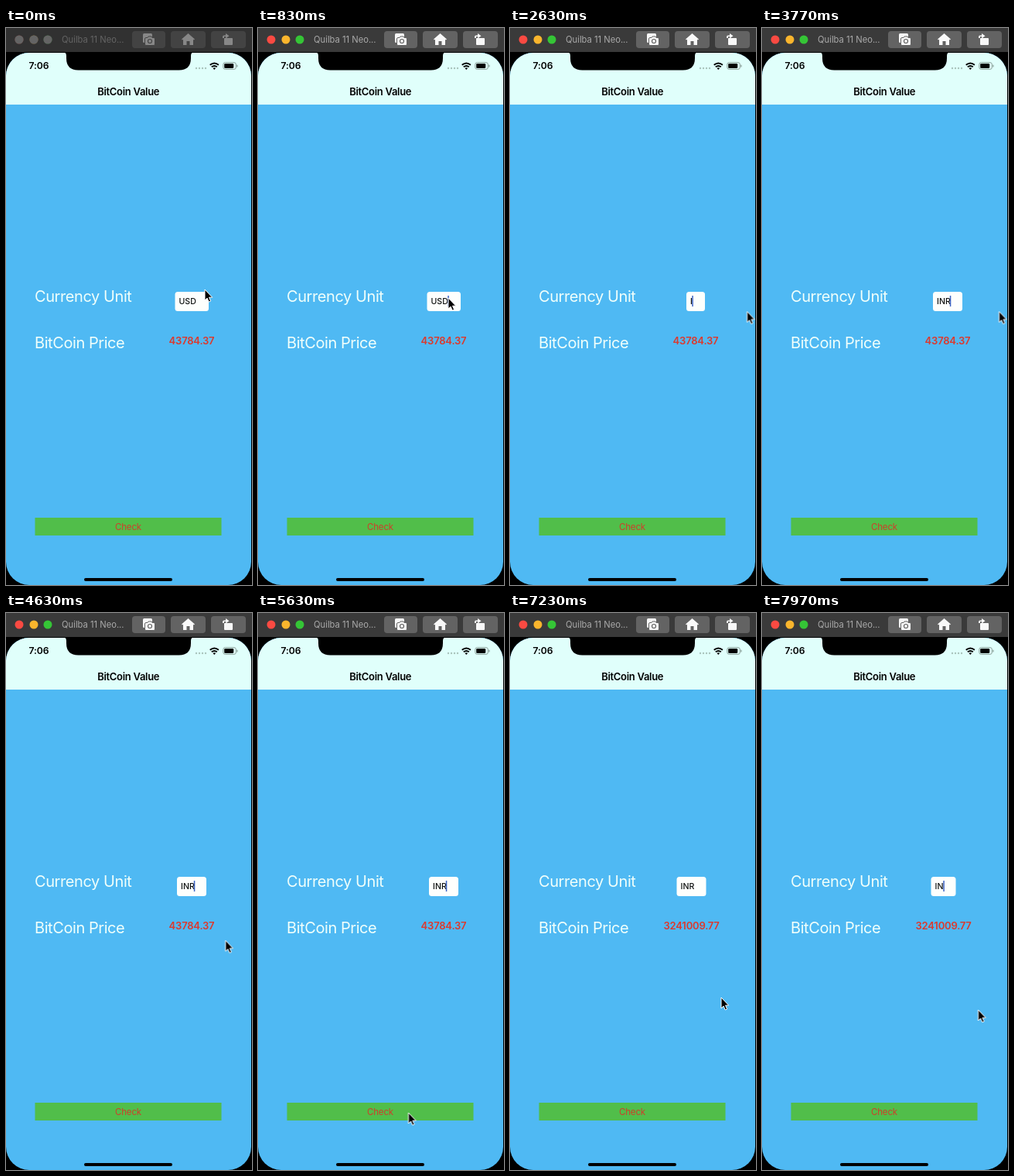
These frames come from a looping animation (318x720 px, 8 s). An HTML page:

```html
<!DOCTYPE html>
<html lang="en">
<head>
<meta charset="utf-8">
<title>BitCoin Value</title>
<style>
  html, body { margin: 0; width: 100%; height: 100%; overflow: hidden; background: #000; }
  svg { display: block; width: 318px; height: 720px; font-family: Inter, "Open Sans", sans-serif; }
  .label { font-size: 20px; letter-spacing: -.42px; fill: #f0fffb; }
  .price { font-size: 13px; font-weight: 600; letter-spacing: -.2px; fill: #dc392d; text-anchor: middle; }
  .unit { font-size: 10.6px; font-weight: 500; fill: #101312; }
  .menu text { font-size: 10.5px; letter-spacing: -.1px; fill: #f2f2f2; text-anchor: middle; }
  .caret { fill: #3c63c4; }
  .tool { fill: #636363; }
</style>
</head>
<body>
<svg viewBox="0 0 318 720">
  <defs>
    <clipPath id="screen"><rect y="32" width="317" height="688" rx="30"/></clipPath>
  </defs>

  <!-- simulator title bar -->
  <rect width="318" height="31" fill="#3a3a3a"/>
  <circle cx="17" cy="15" r="5.5" fill="#fa4a42"/>
  <circle cx="36" cy="15" r="5.5" fill="#fab52d"/>
  <circle cx="54" cy="15" r="5.5" fill="#35c536"/>
  <text x="72" y="19" font-size="11.2" fill="#aaaaaa">Quilba 11 Neo...</text>
  <g class="tool">
    <rect x="163" y="4" width="43" height="22" rx="4"/>
    <rect x="213" y="4" width="45" height="22" rx="4"/>
    <rect x="265" y="4" width="45" height="22" rx="4"/>
  </g>
  <g fill="#f8f8f8">
    <rect x="177" y="7" width="12" height="12" rx="1.5"/>
    <path stroke="#636363" d="M181 12.5h2l1-1.500h4l1 1.500h2q1.500 0 1.500 1.500V21q0 1.500-1.500 1.500H181q-1.500 0-1.500-1.500V14q0-1.500 1.500-1.500Z"/>
    <path d="M235.500 7 244 14.500 243 15.600 242 14.800V22H237.500V17H233.500V22H229V14.800L228 15.600 227 14.500Z"/>
    <rect x="282" y="13" width="11" height="9" rx="1"/>
    <path d="M280 13V11.500q0-2 2-2H284V7l4.500 3.300L284 13.500V11H282V13Z"/>
  </g>
  <circle cx="186" cy="17" r="2.500" fill="none" stroke="#636363" stroke-width="1.200"/>
  <g id="inactive">
    <rect width="318" height="31" fill="#2a2a2a" opacity=".55"/>
    <g fill="#646464">
      <circle cx="17" cy="15" r="5.600"/><circle cx="36" cy="15" r="5.600"/><circle cx="54" cy="15" r="5.600"/>
    </g>
  </g>

  <!-- phone screen -->
  <g clip-path="url(#screen)">
    <rect y="32" width="318" height="688" fill="#4fb9f3"/>
    <rect y="32" width="318" height="67" fill="#e0fffb"/>
    <path d="M73 31q5 0 5 5v3q0 15.500 15.500 15.500H223.500q15.500 0 15.500-15.500v-3q0-5 5-5Z"/>
  </g>
  <text x="29.500" y="53" font-size="12.200" font-weight="600" letter-spacing="-.1">7:06</text>
  <g fill="#a9c4bd">
    <circle cx="246" cy="52" r="1.200"/><circle cx="250" cy="52" r="1.200"/>
    <circle cx="254" cy="52" r="1.200"/><circle cx="258" cy="52" r="1.200"/>
  </g>
  <g fill="none" stroke="#000" stroke-width="1.900">
    <path d="M263.700 47.800q5.600-4.600 11.200 0M265.800 50.300q3.500-2.800 7 0"/>
  </g>
  <path d="M267.500 52q1.800-1.400 3.600 0L269.300 54Z"/>
  <rect x="280.800" y="44.600" width="16.500" height="8.800" rx="2.500" fill="none" stroke="#8a9f98"/>
  <rect x="282.200" y="46" width="12" height="6" rx="1.300"/>
  <rect x="298.300" y="47.500" width="1.200" height="3" rx=".6" fill="#8a9f98"/>
  <text x="158.200" y="87" font-size="13" font-weight="600" letter-spacing="-.3" text-anchor="middle">BitCoin Value</text>

  <text class="label" x="37" y="354">Currency Unit</text>
  <text class="label" x="37" y="414">BitCoin Price</text>
  <text class="price" id="oldPrice" x="240" y="409">43784.37</text>
  <text class="price" id="newPrice" x="234.600" y="409">3241009.77</text>
  <rect x="37.500" y="633" width="241" height="23" fill="#51be4a"/>
  <text id="check" x="158" y="649" font-size="11.500" letter-spacing="-.15" text-anchor="middle" fill="#cf3e2b">Check</text>
  <rect x="101" y="711" width="114" height="4" rx="2"/>

  <g id="fields"></g>

  <g id="selection">
    <rect x="224" y="346" width="22" height="16" fill="#2f6fc0" opacity=".25"/>
    <g fill="#2562b4">
      <rect x="223.200" y="342" width="1.600" height="20"/><circle cx="224" cy="342" r="4.200"/>
      <rect x="245.200" y="346" width="1.600" height="18"/><circle cx="246" cy="364" r="4.200"/>
    </g>
  </g>
  <g class="menu" id="menu">
    <path fill="#1c1c1c" d="M34 305H304q6 0 6 6v16q0 6-6 6H242l-7 7-7-7H34q-6 0-6-6V311q0-6 6-6Z"/>
    <path stroke="#383838" d="M71.500 305V333M124.500 305V333M178.500 305V333M245.500 305V333"/>
    <text x="50.500" y="323">Cut</text>
    <text x="98" y="323">Copy</text>
    <text x="151.300" y="323">Paste</text>
    <text x="212" y="323">Look Up</text>
    <text x="277" y="323">Share...</text>
  </g>

  <path id="cursor" d="M0 0V14L3.100 11.100 5.200 16 7.600 15 5.500 10.200H9.700Z" fill="#000" stroke="#fff" stroke-width="1"/>
</svg>

<script>
const LOOP = 8000;
const $ = id => document.getElementById(id);
const play = (el, frames) => el.animate(frames, { duration: LOOP, iterations: Infinity });

// Visible only inside the given [start, end] spans, with hard switches.
function show(el, ...spans) {
  const on = t => spans.some(([a, b]) => t >= a && t < b) ? 1 : 0;
  const times = [...new Set([0, ...spans.flat(), LOOP])].sort((a, b) => a - b);
  play(el, times.map(t => ({ offset: t / LOOP, opacity: on(t), easing: "step-end" })));
}

// text, box left, box width, caret x, start, end
const fieldStates = [
  ["USD", 218.5, 43.5, 246, 0, 2050],
  ["", 229, 22, 234.5, 2050, 2480],
  ["I", 228, 24, 236, 2480, 2900],
  ["IN", 224, 32, 240.5, 2900, 3250],
  ["INR", 221, 38, 243.5, 3250, 6300],
  ["INR", 215.5, 38, 238, 6300, 7830],
  ["IN", 218.5, 32, 235, 7830, LOOP]
];
const caretSpans = [[600, 850], [2050, 4060], [4500, 5060], [5500, 6060], [6500, 7060], [7500, LOOP]];

for (const [text, x, width, caretX, start, end] of fieldStates) {
  const group = document.createElementNS("http://www.w3.org/2000/svg", "g");
  group.innerHTML = `
    <rect x="${x}" y="341" width="${width}" height="25" rx="3.5" fill="#fdfffd"/>
    <text class="unit" x="${x + 5}" y="357">${text}</text>
    <rect class="caret" x="${caretX - 0.7}" y="346" width="1.500" height="14"/>`;
  $("fields").append(group);
  show(group, [start, end]);
  show(group.querySelector(".caret"), ...caretSpans);
}

show($("inactive"), [0, 300]);
show($("selection"), [850, 2050]);
show($("menu"), [950, 2050]);
show($("oldPrice"), [0, 6300]);
show($("newPrice"), [6300, LOOP]);

play($("check"), [[0, 1], [5750, 1], [5780, .3], [5880, .3], [6100, 1], [LOOP, 1]]
  .map(([t, opacity]) => ({ offset: t / LOOP, opacity })));

// time, x, y of the pointer tip
const pointerPath = [
  [0, 257, 338], [150, 257, 338], [400, 246, 349], [900, 246, 349], [1280, 306.5, 366.5],
  [4350, 306.5, 366.5], [5250, 194.5, 646], [6350, 194.5, 646], [7100, 273, 497],
  [7350, 273, 497], [7750, 279.5, 513], [LOOP, 279.5, 513]
];
play($("cursor"), pointerPath.map(([t, x, y]) => ({
  offset: t / LOOP, transform: `translate(${x}px, ${y}px)`, easing: "ease-in-out"
})));
</script>
</body>
</html>
```
